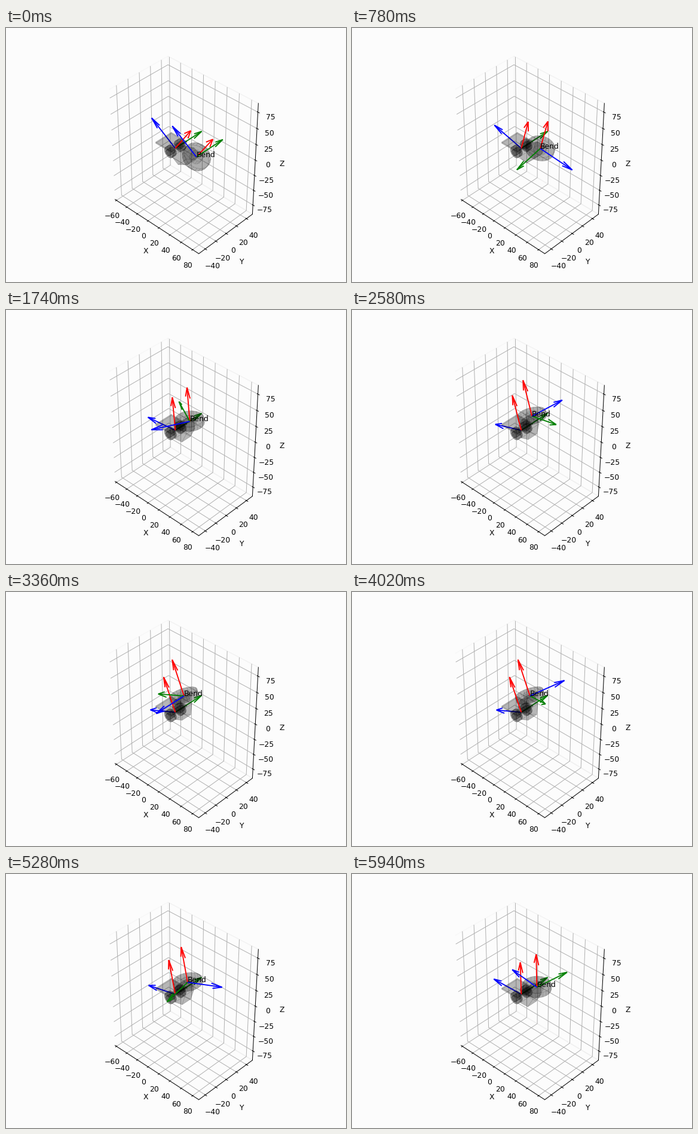
These frames come from a looping animation (569x425 px, 6 s). A matplotlib script:

```python
import numpy as np
import matplotlib.pyplot as plt
from matplotlib.animation import FuncAnimation
from mpl_toolkits.mplot3d.art3d import Poly3DCollection

W, H, DPI = 569, 425, 89
FRAMES, INTERVAL = 100, 60
TIMES = np.linspace(0, 2.5, FRAMES)
PAPER = "#fcfcfc"
ARROW = 50
BEND_OFFSET = np.array([25, 0, -28])
LIMITS = np.array([(-62.7, 90.7), (-52.1, 52.1), (-91.0, 88.2)])


def tilt(angle):
    """Rotation about y that lifts the x axis towards z."""
    c, s = np.cos(angle), np.sin(angle)
    return np.array([[c, 0, -s], [0, 1, 0], [s, 0, c]])


def spin(angle):
    """Rotation about x."""
    c, s = np.cos(angle), np.sin(angle)
    return np.array([[1, 0, 0], [0, c, -s], [0, s, c]])


def prism(outline, low, high, axis):
    """Faces of a 2D outline extruded from low to high along an axis."""
    outline = np.asarray(outline, float)
    bottom = np.insert(outline, axis, low, axis=1)
    top = np.insert(outline, axis, high, axis=1)
    count = len(outline)
    sides = [
        np.array([bottom[i], bottom[j], top[j], top[i]])
        for i, j in ((k, (k + 1) % count) for k in range(count))
    ]
    return [bottom, top] + sides


def circle(radius, count=24):
    a = np.linspace(0, 2 * np.pi, count, endpoint=False)
    return radius * np.column_stack([np.cos(a), np.sin(a)])


def place(faces, rotation, origin=(0, 0, 0)):
    return [face @ rotation.T + origin for face in faces]


fig = plt.figure(figsize=((W + 0.01) / DPI, (H + 0.01) / DPI), dpi=DPI,
                 facecolor=PAPER)
fig.subplots_adjust(left=0.1258, right=0.9008, bottom=0.1095, top=0.8795)
ax = fig.add_subplot(projection="3d", computed_zorder=False)
ax.set_facecolor("none")
ax.view_init(elev=38, azim=-46.5)
ax.set(xlim=LIMITS[0], ylim=LIMITS[1], zlim=LIMITS[2],
       xlabel="X", ylabel="Y", zlabel="Z")
ax.set_box_aspect(np.ptp(LIMITS, axis=1))
for axis in (ax.xaxis, ax.yaxis, ax.zaxis):
    axis.pane.set_fill(False)


def add_mesh(faces, alpha, edge=0.12):
    mesh = Poly3DCollection(faces, facecolors=(0, 0, 0, alpha),
                            edgecolors=(0, 0, 0, edge), linewidths=0.5,
                            zorder=2)
    ax.add_collection3d(mesh)
    return mesh


# Fixed base: a thin plate and two hinge drums along y
PLATE = [(-21, -14.4), (7, -14.4), (7, 14.4), (-21, 14.4)]
add_mesh(prism(PLATE, 5, 7, axis=2), 0.15)
for low, high in ((-12, -6), (6, 12)):
    add_mesh(prism(circle(8, 16), low, high, axis=1), 0.22)
    add_mesh(prism(circle(4.5, 12), low - 1, high + 1, axis=1), 0.17)

# Moving parts: the tilting arm and the spinning disc
ARM_PROFILE = [(-6, -6), (-6, -19), (10, -28), (24, -28), (22, -16), (6, -3)]
ARM = prism(ARM_PROFILE, -8, 8, axis=1)
DISC = prism(circle(18.3), -3, 4, axis=0)
HUB = prism(circle(8, 16), -4, 4, axis=0)
arm = add_mesh(ARM, 0.15)
disc = add_mesh(DISC, 0.17)
hub = add_mesh(HUB, 0.03, 0.08)

label = ax.text(0, 0, 0, "Bend", zorder=6)
arrows = []


def draw_axes(origin, rotation, zorders):
    for direction, color, z in zip(rotation.T, ("red", "green", "blue"), zorders):
        arrows.append(ax.quiver(*origin, *direction, length=ARROW,
                                color=color, zorder=z))


def update(i):
    while arrows:
        arrows.pop().remove()
    t = TIMES[i]
    hinge = tilt(1 + np.sin(t))
    wheel = hinge @ spin(10 * t)
    bend = hinge @ BEND_OFFSET

    arm.set_verts(place(ARM, hinge))
    disc.set_verts(place(DISC, wheel, bend))
    hub.set_verts(place(HUB, wheel, bend))
    draw_axes((0, 0, 0), hinge, (4, 1, 1))
    draw_axes(bend, wheel, (4, 4, 4))
    label.set_position_3d(bend)
    return []


anim = FuncAnimation(fig, update, frames=FRAMES, init_func=lambda: [],
                     interval=INTERVAL, repeat=True, repeat_delay=0)
plt.show()
```
